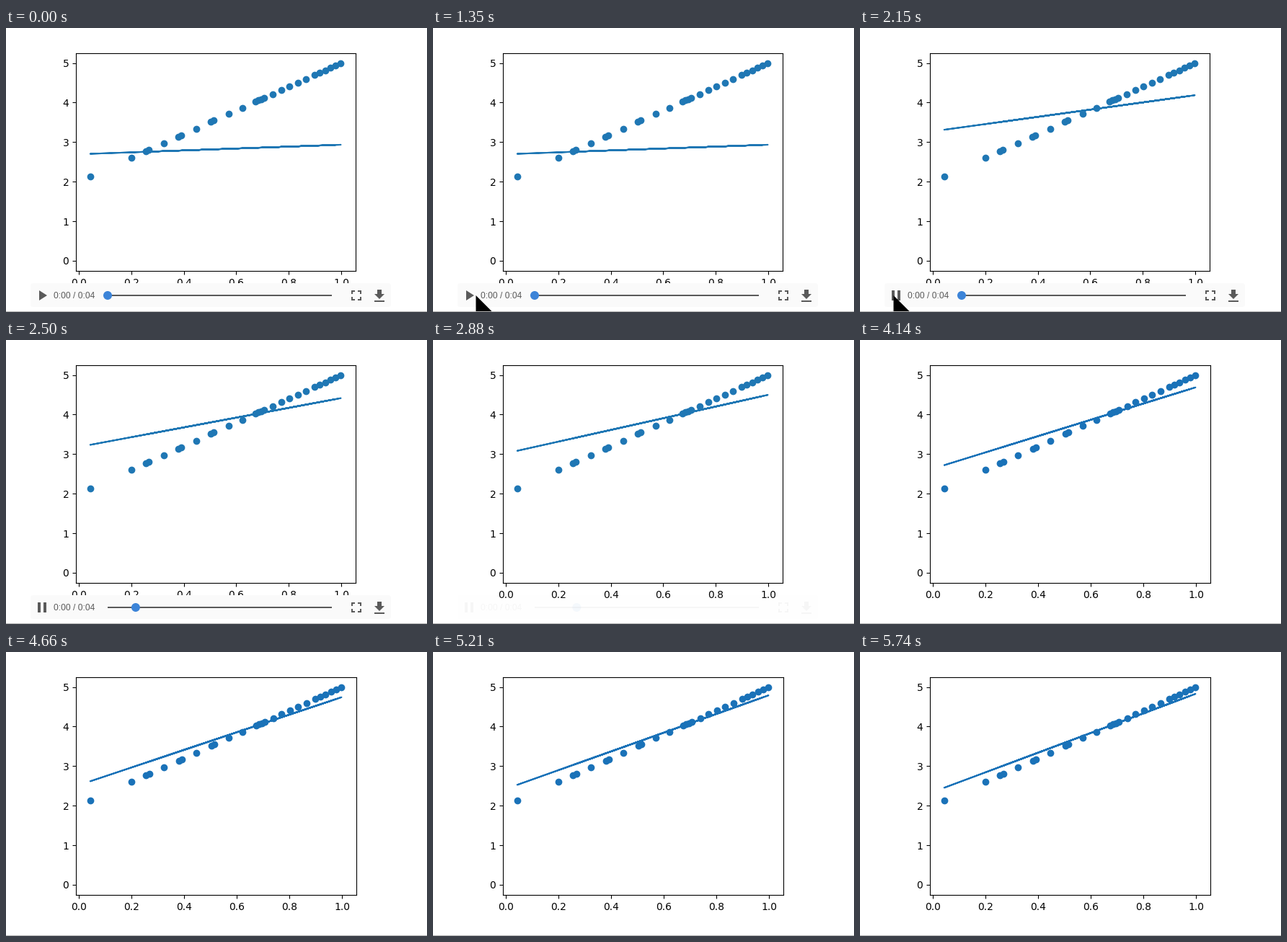
Write a matplotlib script that moves like this. It is 584x394 px and loops after 6510 ms.

```python
import numpy as np
import matplotlib.pyplot as plt
from matplotlib.animation import FuncAnimation
from matplotlib.patches import Circle, FancyBboxPatch, Polygon, Rectangle

W, H, DPI = 584, 394, 100
LOOP, INTERVAL = 6510, 30
PX = 72 / DPI            # points per pixel
ENTER, PLAY, SETTLE, STOP = 570, 1960, 2955, 5740
GREY = "#5a5a5a"

# Runs of evenly spaced samples; the sparse ones bunch into loose pairs.
k = np.arange(27)
xs = np.interp(k, [0, 1, 10, 12, 15, 21, 26],
               [.058, .2, .571, .674, .707, .898, .9985])
xs += np.where(k < 11, .017 * np.sin(2 * np.pi * (k - 1) / 3), 0)
# Drawn in random order, the line runs over itself and looks heavier.
line_xs = np.random.default_rng(1).permutation(xs)


def fit(seconds):
    """Slope and intercept of a descent with one slow and one fast mode."""
    slow = 2.17 * np.exp(-.38 * seconds)
    fast = np.exp(-12 * seconds)
    return 3 - slow - .59 * fast, 2 + .67 * slow - .76 * fast


def ramp(t, start, end):
    return np.clip((t - start) / (end - start), 0, 1)


def pointer_tip(t):
    """Slide in, glide to the button, nudge onto it, leave to the left."""
    x = (108.5 - 9 * ramp(t, 570, 640) - 40 * ramp(t, 960, 1350)
         - 13 * ramp(t, 1490, 1510) - 38 * ramp(t, 2325, 2430))
    y = (382 + ramp(t, 570, 640) - 12 * ramp(t, 960, 1350)
         + 15 * ramp(t, 2325, 2430))
    return x, y


fig = plt.figure(figsize=(W / DPI, H / DPI), dpi=DPI, facecolor="white")


def place(axes, left, top, right, bottom):
    axes.set_position([left / W, 1 - bottom / H,
                       (right - left) / W, (bottom - top) / H])


plot = fig.add_axes([0, 0, 1, 1])
plot.set(xlim=(-4 / 364, 384 / 364), ylim=(-14 / 54.9, 288 / 54.9),
         xticks=np.arange(6) / 5, yticks=range(6))
dots = plot.scatter(xs, 3 * xs + 2, s=36)
line, = plot.plot(line_xs, line_xs, lw=1.5)

stage = fig.add_axes([0, 0, 1, 1], zorder=2)
stage.set(xlim=(0, W), ylim=(H, 0))
stage.axis("off")
stage.plot([0, W], [392.5, 392.5], color="#b4b4b4", lw=PX)

controls = []


def control(artist):
    controls.append(artist)
    return artist


def shape(*points):
    return control(stage.add_patch(Polygon(points, fc=GREY, lw=0)))


def box(x, y, w, h):
    return control(stage.add_patch(Rectangle((x, y), w, h, fc=GREY, lw=0)))


control(stage.add_patch(FancyBboxPatch(
    (38, 358), 492, 25, boxstyle="round,pad=4,rounding_size=4",
    fc="#fafafa", lw=0)))
play_icon = shape((46, 364), (46, 378), (57, 371))
pause_icon = [box(x, 364, 4, 14) for x in (44, 52)]
control(stage.text(66, 375, "0:00 / 0:04", color=GREY, size=12 * PX,
                   family="Liberation Sans"))
box(141, 370, 311, 2)
knob = control(stage.add_patch(Circle((141, 371), 6, fc="#3c84d8", lw=0)))

# Full screen corners and download arrow
for sx in (-1, 1):
    for sy in (-1, 1):
        shape(*[(486 + sx * u, 371 + sy * v) for u, v in
                ((7, 7), (2, 7), (2, 5), (5, 5), (5, 2), (7, 2))])
box(515, 363, 6, 6)
shape((511, 369), (525, 369), (518, 376))
box(511, 378, 14, 2)

pointer = stage.add_patch(Polygon([(0, 0), (1, 1), (0, 1)], fc="black", lw=0))


def update(i):
    t = (i + .5) * INTERVAL
    seconds = np.clip(t - PLAY, 0, STOP - PLAY) / 1000
    settled = t >= SETTLE

    place(plot, 97, 35, 486 if settled else 485, 337)
    color = "#1a72b8" if settled else "#1f77b4"
    slope, intercept = fit(seconds)
    line.set_ydata(slope * line_xs + intercept)
    for artist in (dots, line):
        artist.set_color(color)

    for artist in controls:
        artist.set_alpha(1 - ramp(t, 2600, 2910))
    play_icon.set_visible(t < PLAY)
    for bar in pause_icon:
        bar.set_visible(t >= PLAY)
    # The seek knob advances only every quarter second.
    knob.center = (141 + 311 * (seconds // .25) / 16, 371)

    x, y = pointer_tip(t)
    pointer.set_xy([(x, y), (x + 40, y + 40), (x, y + 57)])
    pointer.set_visible(ENTER <= t < 2460)
    return [dots, line, knob, pointer]


anim = FuncAnimation(fig, update, frames=LOOP // INTERVAL, interval=INTERVAL,
                     init_func=lambda: update(0), repeat=True, repeat_delay=0)
plt.show()
```
